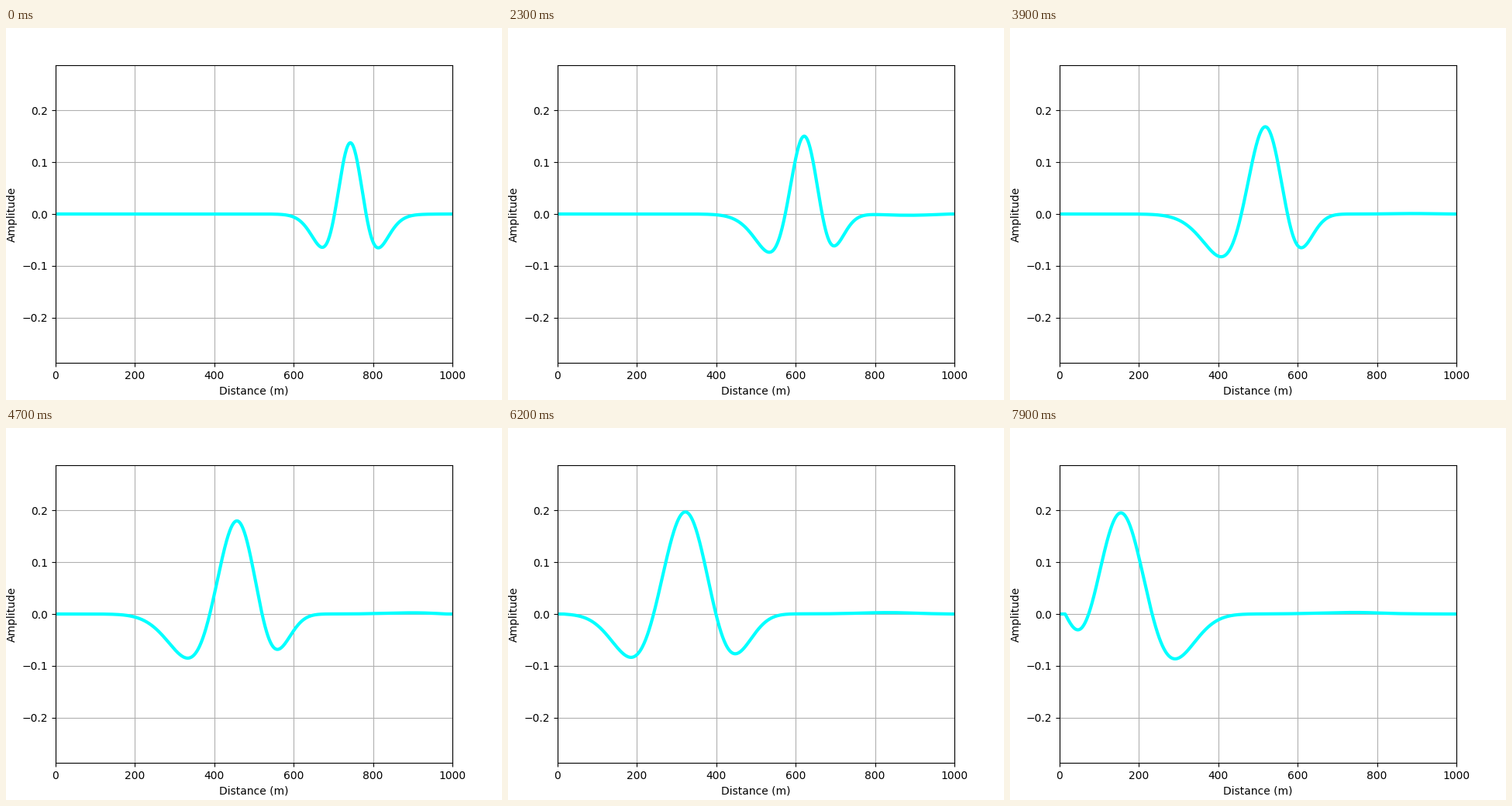
Animation, 640 px wide and 480 px high, one loop 8000 ms. Source, as a matplotlib script:

```python
import numpy as np
import matplotlib.pyplot as plt
from matplotlib.animation import FuncAnimation

FRAMES = 80
INTERVAL = 100
SUBSTEPS = 20
WALL = 15  # fixed ends, metres from each side

x = np.arange(1001.0)
speed = 7.5 + 2.5 * np.sin(2 * np.pi * x / 1000)  # metres per frame
slowness = 1 / speed
travel = np.concatenate(([0], np.cumsum((slowness[1:] + slowness[:-1]) / 2)))


def delay(start):
    """Travel time from start to every point."""
    return travel - np.interp(start, x, travel)


def ricker(t, width):
    s = (t / width) ** 2
    return (1 - 2 * s) * np.exp(-s)


def pin_ends(u):
    u[:WALL] = 0
    u[-WALL:] = 0
    return u


def start_wave(t):
    """Main pulse going left, faint broad echo going right."""
    gain = np.sqrt(speed / speed.min())
    pulse = 0.139 * ricker(delay(743) + t, 11.3)
    echo = -0.0022 * np.exp(-((delay(788) - t) / 18) ** 2)
    return pin_ends(gain * (pulse + echo))


def simulate():
    """Solve u_tt = c^2 u_xx and keep one row per frame."""
    dt = 1 / SUBSTEPS
    factor = (speed[1:-1] * dt) ** 2
    prev, cur = start_wave(-dt), start_wave(0)
    rows = [cur]
    for _ in range(FRAMES - 1):
        for _ in range(SUBSTEPS):
            nxt = 2 * cur - prev
            nxt[1:-1] += factor * (cur[2:] - 2 * cur[1:-1] + cur[:-2])
            prev, cur = cur, pin_ends(nxt)
        rows.append(cur)
    return rows


waves = simulate()

fig = plt.figure(figsize=(6.4, 4.8), dpi=100)
ax = fig.add_axes([0.1, 0.1, 0.8, 0.8])
ax.set_xlim(0, 1000)
ax.set_ylim(-0.287, 0.287)
ax.set_xlabel("Distance (m)")
ax.set_ylabel("Amplitude")
ax.grid(True)
line, = ax.plot(x, waves[0], color="cyan", lw=3)


def update(i):
    line.set_ydata(waves[i])
    return line,


anim = FuncAnimation(fig, update, frames=FRAMES, interval=INTERVAL,
                     repeat=True, repeat_delay=0)
plt.show()
```
